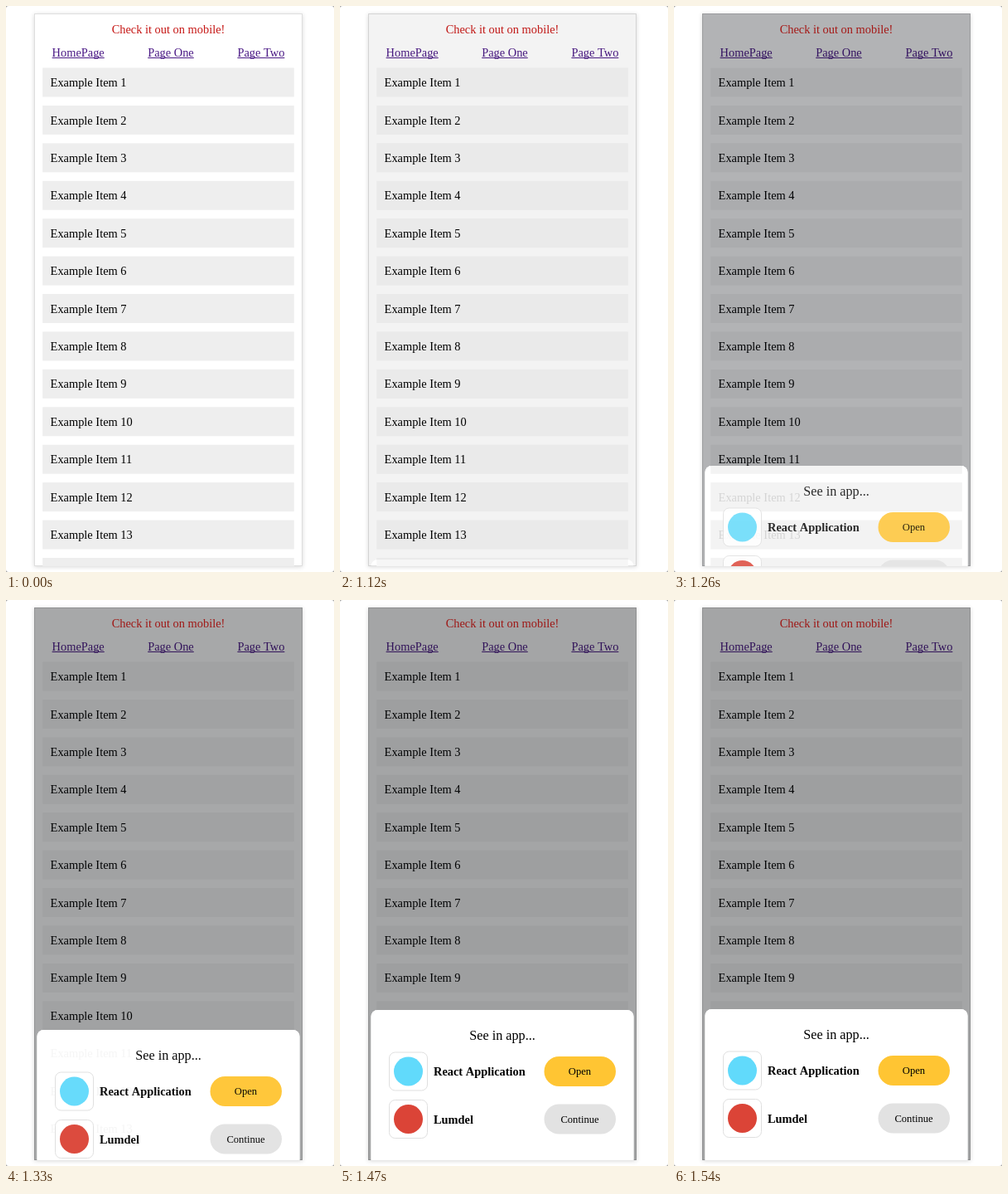
An HTML page with a canvas for the animation above (2380 ms loop, 396x682 px).

```html
<!DOCTYPE html>
<html lang="en">
<head>
<meta charset="utf-8">
<title>Open in app sheet</title>
<style>
html, body { margin: 0; width: 100%; height: 100%; overflow: hidden; background: #fff; }
canvas { display: block; width: 396px; height: 682px; }
</style>
</head>
<body>
<canvas id="stage" width="396" height="682"></canvas>
<script>
const ctx = document.getElementById('stage').getContext('2d');
const SERIF = '"Liberation Serif", "Times New Roman", serif';
const LOOP = 2380, START = 1120, STEP = 70;
const PAGE = { x: 34, y: 9, w: 324, h: 666 };
const SHEET = { x: 37.5, w: 317, h: 200 };
// Sheet top and opacity at each step of the entrance
const TOPS = [667, 601, 554, 518, 497, 494, 493];
const FADES = [0.13, 0.52, 0.83, 0.96, 1, 1, 1];

function box(x, y, w, h, r, fill, stroke) {
  ctx.beginPath();
  ctx.roundRect(x, y, w, h, r);
  if (fill) { ctx.fillStyle = fill; ctx.fill(); }
  if (stroke) { ctx.strokeStyle = stroke; ctx.lineWidth = 1; ctx.stroke(); }
}

function text(str, x, y, size = 14.4, color = '#000', align = 'left', weight = 'normal') {
  ctx.font = `${weight} ${size}px ${SERIF}`;
  ctx.textAlign = align;
  ctx.fillStyle = color;
  ctx.fillText(str, x, y);
}

function dot(x, y, r, color) {
  ctx.fillStyle = color;
  ctx.beginPath();
  ctx.arc(x, y, r, 0, 7);
  ctx.fill();
}

function link(str, x) {
  text(str, x, 61, 14.4, '#4b1a86');
  ctx.fillRect(x, 62, ctx.measureText(str).width, 1);
}

function drawFrame() {
  ctx.fillStyle = '#fff';
  ctx.fillRect(0, 0, 396, 682);
  ctx.save();
  ctx.shadowColor = 'rgba(0,0,0,.16)';
  ctx.shadowBlur = 5;
  ctx.shadowOffsetY = 1;
  box(PAGE.x, PAGE.y, PAGE.w, PAGE.h, 0, '#fff');
  ctx.restore();
  // Rounded window corners
  for (const x of [0, 396]) for (const y of [0, 682]) {
    const dx = x ? -1 : 1, dy = y ? -1 : 1;
    ctx.fillStyle = '#999';
    ctx.beginPath();
    ctx.moveTo(x, y);
    ctx.lineTo(x + 3 * dx, y);
    ctx.quadraticCurveTo(x, y, x, y + 3 * dy);
    ctx.fill();
  }
}

function drawPage(itemColor) {
  ctx.fillStyle = '#fff';
  ctx.fillRect(PAGE.x, PAGE.y, PAGE.w, PAGE.h);
  ctx.strokeStyle = '#dedede';
  ctx.lineWidth = 1;
  ctx.strokeRect(PAGE.x + 0.5, PAGE.y + 0.5, PAGE.w - 1, PAGE.h - 1);
  link('HomePage', 55.6);
  link('Page One', 171.2);
  link('Page Two', 279.4);
  for (let i = 0; i < 14; i++) {
    const y = 74.5 + i * 45.42;
    ctx.fillStyle = itemColor;
    ctx.fillRect(44.2, y, 303.6, 35);
    text('Example Item ' + (i + 1), 53.6, y + 22.6);
  }
}

function drawRow(y, name, color, label, fill) {
  box(59.5, y, 46, 46, 7, '#fff', '#dfdfdf');
  dot(82.5, y + 23, 17.5, color);
  text(name, 113, y + 28, 14.4, '#000', 'left', 'bold');
  box(246.5, y + 5, 86.5, 36, 18, fill);
  text(label, 289.5, y + 27, 12.6, '#000', 'center');
}

function drawSheet(top, fade) {
  // The dimming surrounds the sheet but does not lie under it
  ctx.fillStyle = `rgba(3,6,11,${0.362 * fade})`;
  ctx.beginPath();
  ctx.rect(PAGE.x, PAGE.y, PAGE.w, PAGE.h);
  ctx.roundRect(SHEET.x, top, SHEET.w, SHEET.h, 8);
  ctx.fill('evenodd');

  ctx.save();
  if (fade > 0.2 && fade < 0.9) {
    const shade = Math.round(255 - 12 / (1 - fade));
    ctx.beginPath();
    ctx.roundRect(SHEET.x, top, SHEET.w, SHEET.h, 8);
    ctx.clip();
    drawPage(`rgb(${shade},${shade},${shade})`);
  }
  ctx.globalAlpha = fade;
  box(SHEET.x, top, SHEET.w, SHEET.h, 8, '#fff');
  text('See in app...', 196, top + 36, 16.2, '#000', 'center');
  drawRow(top + 51, 'React Application', '#61dafb', 'Open', '#ffc533');
  drawRow(top + 108.5, 'Lumdel', '#db4437', 'Continue', '#e2e2e2');
  ctx.restore();
}

function draw(time) {
  const t = time % LOOP;
  const step = Math.min(Math.floor((t - START) / STEP), TOPS.length - 1);
  const open = step >= 0;
  const fade = open ? FADES[step] : 0;
  drawFrame();
  ctx.save();
  ctx.beginPath();
  ctx.rect(PAGE.x, PAGE.y, PAGE.w, PAGE.h);
  ctx.clip();
  drawPage(open ? '#f5f5f5' : '#eee');
  if (open) drawSheet(TOPS[step], fade);
  text('Check it out on mobile!', 196, 33.4, 14.4, `rgb(${198 - 40 * fade},24,22)`, 'center');
  ctx.restore();
}

const begin = performance.now();
function tick() {
  draw(performance.now() - begin);
  requestAnimationFrame(tick);
}
tick();
</script>
</body>
</html>
```
